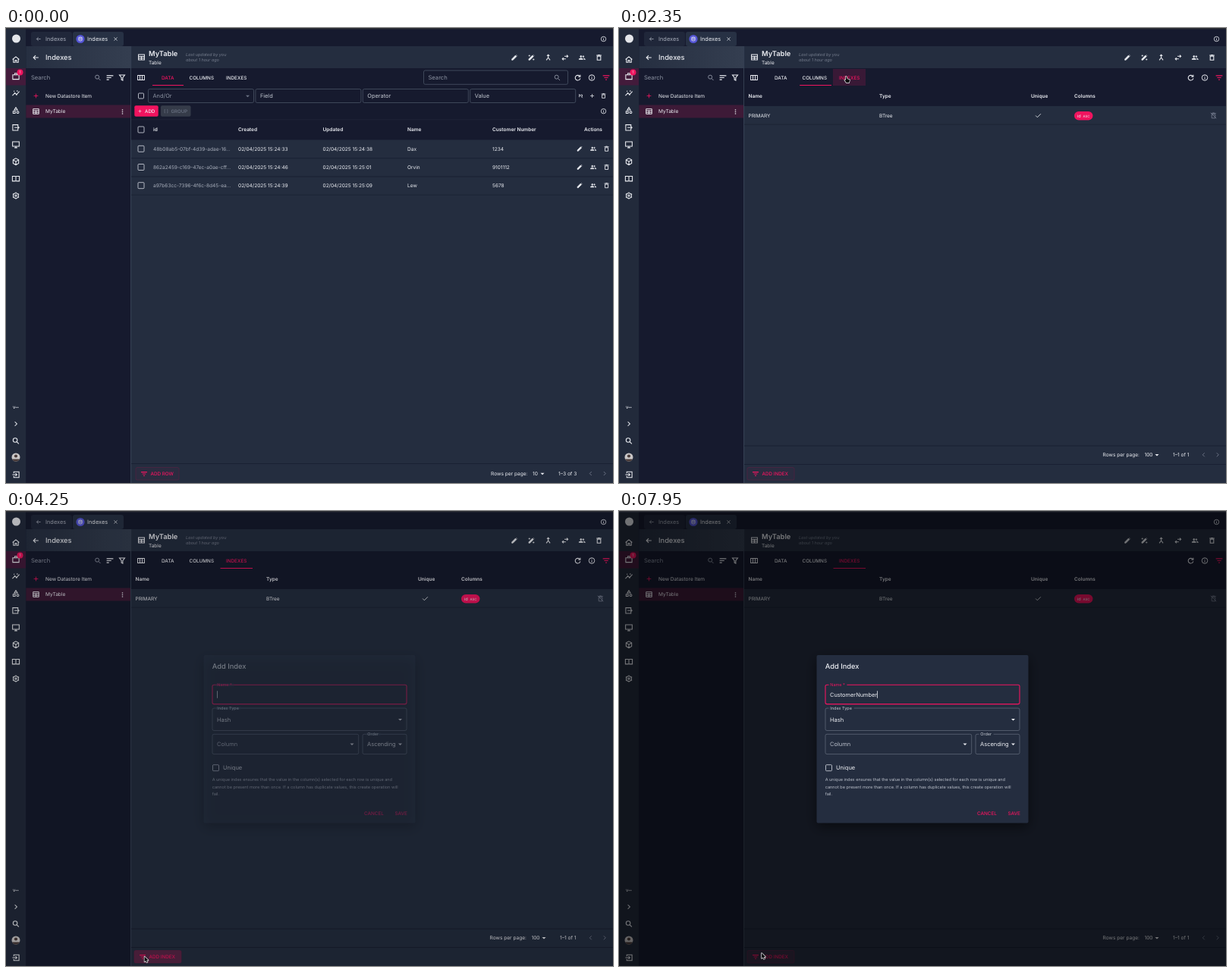
These frames come from a looping animation (800 by 600 pixels, 8000 ms). An HTML page with a canvas:

```html
<!DOCTYPE html>
<html lang="en">
<head>
<meta charset="utf-8">
<title>Add index</title>
<style>
html, body { margin: 0; width: 100%; height: 100%; overflow: hidden; background: #161a2e; }
canvas { display: block; width: 800px; height: 600px; }
</style>
</head>
<body>
<canvas id="stage" width="800" height="600"></canvas>
<script>
const ctx = document.getElementById('stage').getContext('2d');
ctx.textRendering = 'geometricPrecision';
const LOOP = 8000;
const NAVY = '#161a2e', SLATE = '#242d3f', PINK = '#f0145f', WHITE = '#eceef3',
  SOFT = '#a7adba', DIM = '#6d7586', EDGE = '#4a5365', LINE = '#192033';

// 24-unit icons, drawn as strokes; those in SOLID are filled too
const disc = (x, y, r) => `M${x + r} ${y}a${r} ${r} 0 1 1 ${-2 * r} 0a${r} ${r} 0 1 1 ${2 * r} 0`;
const PENCIL = 'M4 20v-3.5L15.5 5l3.5 3.5L7.5 20zM18 3l3 3', TRASH = 'M6.5 8v12h11V8zM4 5h16M9 3.5h6';
const SOLID = ['pencil', 'wand', 'people'];
const ICONS = {
  home: 'M5 11v9h5v-6h4v6h5v-9M2.5 12 12 4l9.5 8',
  work: 'M3 7h18v13H3zM9 7V3h6v4',
  trend: 'M2 18l7-7 5 4 8-9M16 3v4M7 4v3' + disc(9, 11, 1) + disc(14, 15, 1),
  shapes: 'M12 3l4.5 7h-9zM4 14h6v6H4z' + disc(17.5, 17, 3),
  output: 'M18 8V4H3v16h15v-4M8 12h13M17 8l4 4-4 4',
  screen: 'M2.5 4h19v13h-19zM8 21h8M12 17v4',
  box: 'M12 2.5l8 4.5v10l-8 4.5L4 17V7zM4 7l8 5 8-5M12 12v9',
  book: 'M12 6v14M2 5h7q3 0 3 2 0-2 3-2h7v14h-7q-3 0-3 1 0-1-3-1H2z',
  gear: disc(12, 12, 7.5) + disc(12, 12, 2.5) + 'M12 2v3M12 19v3M3 7l3 2M18 15l3 2M3 17l3-2M18 9l3-2',
  right: 'M9 6l6 6-6 6',
  left: 'M15 6l-6 6 6 6',
  search: disc(10, 10, 6) + 'M14.5 14.5l6 6',
  login: 'M6 8V4h15v16H6v-4M2 12h13M11 8l4 4-4 4',
  back: 'M20 12H5M11 5l-7 7 7 7',
  close: 'M5 5l14 14M19 5L5 19',
  info: disc(12, 12, 9) + 'M12 11v6M12 7v2',
  sort: 'M2 6h20M2 12h14M2 18h7',
  funnel: 'M4 4h16l-6 8v8l-4-2v-6z',
  plus: 'M12 4v16M4 12h16',
  table: 'M3 4h18v16H3zM3 9.5h18M3 15h18M12 9v11',
  columns: 'M2 5h20v14H2zM8.7 5v14M15.3 5v14',
  pencil: PENCIL,
  wand: PENCIL + 'M6 3v6M3 6h6M19 15v6M16 18h6',
  merge: 'M12 3v9l-6 8M12 12l6 8M8 7l4-4 4 4',
  swap: 'M10 8h11M17 4l4 4-4 4M14 16H3M7 12l-4 4 4 4',
  people: disc(8.5, 8.5, 2.5) + disc(16, 8.5, 2) + 'M2.5 18v-2q6-4 12 0v2zM17 14q5 1 5 4h-4',
  trash: TRASH,
  trashOff: TRASH + 'M3 3l18 18',
  refresh: 'M18 7a8 8 0 1 0 2 7M20 3v6h-6',
  filter: 'M2 6h20M6 12h12M10 18h4',
  check: 'M3 12l6 6L21 6',
  unlink: 'M5 5l14 15M6 8v9M11 8h7v7',
  braces: 'M8 4H5v16h3M16 4h3v16h-3',
  db: 'M5 6q7-5 14 0v12q-7 5-14 0zM5 6q7 4 14 0M5 12q7 4 14 0'
};
for (const name in ICONS) ICONS[name] = new Path2D(ICONS[name]);

const ARROW = new Path2D('M0 0v8.2l2-1.7 1.4 2.9 1.4-.7-1.4-2.7h2.6z');
const HAND = new Path2D('M-1 0q1-1.2 1.7 0l.5 3 3.4 1q.9.4.6 1.5l-.8 3.3H.2L-2.6 5q.2-1.2 1.9-.1z');

function icon(name, x, y, size = 10, color = WHITE, width = 2.3) {
  ctx.save();
  ctx.translate(x - size / 2, y - size / 2);
  ctx.scale(size / 24, size / 24);
  ctx.strokeStyle = ctx.fillStyle = color;
  const solid = SOLID.includes(name);
  ctx.lineWidth = solid ? 1.6 : width;
  ctx.stroke(ICONS[name]);
  if (solid) ctx.fill(ICONS[name]);
  ctx.restore();
}

function fill(x, y, w, h, color, r = 0) {
  ctx.fillStyle = color;
  ctx.beginPath();
  ctx.roundRect(x, y, w, h, r);
  ctx.fill();
}

function frame(x, y, w, h, color = EDGE, r = 2, width = 0.8) {
  ctx.strokeStyle = color;
  ctx.lineWidth = width;
  ctx.beginPath();
  ctx.roundRect(x, y, w, h, r);
  ctx.stroke();
}

function dot(x, y, r, color) {
  ctx.fillStyle = color;
  ctx.beginPath();
  ctx.arc(x, y, r, 0, 7);
  ctx.fill();
}

// y is the middle of the capital letters
function text(str, x, y, size = 6.6, color = WHITE, weight = 400, style = '') {
  ctx.font = `${style} ${weight} ${size}px Inter, sans-serif`;
  ctx.fillStyle = color;
  ctx.fillText(str, x, y + size * 0.364);
}

function caretDown(x, y, color = WHITE) {
  ctx.fillStyle = color;
  ctx.beginPath();
  ctx.moveTo(x - 2.5, y - 1.2);
  ctx.lineTo(x + 2.5, y - 1.2);
  ctx.lineTo(x, y + 1.3);
  ctx.fill();
}

const checkbox = (x, y, s = 8) => frame(x - s / 2, y - s / 2, s, s, '#c3c8d2', 1, 0.9);
const clamp = v => Math.max(0, Math.min(1, v));
const ramp = (t, a, b) => clamp((t - a) / (b - a));
const smooth = v => v * v * (3 - 2 * v);
// press feedback: quick rise, slow fade
const ripple = (t, at) => ramp(t, at, at + 200) * (1 - ramp(t, at + 250, at + 750));

const TAB_CLICK = 2100, ADD_CLICK = 4050;
const PAGE_SWAP = TAB_CLICK + 100, DIALOG_OPEN = ADD_CLICK + 100;

function rail() {
  fill(0, 0, 26, 600, '#222a3b');
  fill(0, 53, 26, 22.5, '#431b3b');
  dot(13.5, 14, 5.5, '#e4e6ea');
  const names = ['home', 'work', 'trend', 'shapes', 'output', 'screen', 'box', 'book', 'gear'];
  names.forEach((n, i) => icon(n, 13, 41.5 + i * 22.45, 11));
  dot(18.5, 58.5, 4, PINK);
  text('1', 17.6, 58.5, 5);
  text('V••', 9, 500, 4.6, WHITE, 600);
  icon('right', 13, 522, 11);
  icon('search', 13, 544.5, 11);
  dot(13, 566, 5.5, '#c9c6c6');
  dot(13, 564.5, 2.1, '#4a3c3a');
  ctx.beginPath();
  ctx.arc(13, 566, 5.5, 0.45, Math.PI - 0.45);
  ctx.fill();
  icon('login', 13, 589, 11);
}

function tabStrip() {
  fill(26, 0, 774, 24, NAVY);
  fill(33, 5, 54, 19, '#20273a', 3);
  icon('back', 43, 14.5, 8, SOFT);
  text('Indexes', 52, 14.5, 7.4, SOFT);
  fill(88, 5, 67, 19, '#273144', 3);
  dot(98, 14.5, 5.6, '#5455d6');
  icon('db', 98, 14.5, 7.5);
  text('Indexes', 107, 14.5, 7.4);
  icon('close', 144.5, 14.5, 7, WHITE, 2.6);
  icon('info', 787.5, 14.5, 8.5);
}

function sidebar() {
  fill(26, 24, 138, 576, NAVY);
  const head = ctx.createLinearGradient(26, 0, 164, 0);
  head.addColorStop(0, '#262f41');
  head.addColorStop(1, '#343e50');
  fill(26, 24, 138, 29, head);
  icon('back', 39.5, 39, 10, WHITE, 2.6);
  text('Indexes', 52, 39, 9.3, WHITE, 500);
  text('Search', 33, 65.5, 7.6, '#8b92a1');
  icon('search', 121, 65.5, 10, '#8b92a1');
  icon('sort', 137, 65.5, 10.5, WHITE, 2.6);
  icon('funnel', 153, 65.5, 10.5, WHITE, 2.5);
  icon('plus', 39.5, 89.5, 8.5, PINK);
  text('New Datastore Item', 52, 89.5, 6.55);
  fill(26, 101.5, 138, 17, '#3d1a37');
  icon('table', 39.5, 110, 10);
  text('MyTable', 52, 110, 6.55);
  for (const dy of [-2.5, 0, 2.5]) dot(153.5, 110.5 + dy, 0.8, WHITE);
  fill(25.6, 24, 0.8, 576, '#1b2234');
}

function mainHead(t) {
  fill(165, 24, 635, 576, SLATE);
  fill(164, 24, 1.2, 576, '#343e51');
  icon('table', 178.5, 38.5, 10.5);
  text('MyTable', 188, 34, 9.3, WHITE, 600);
  text('Table', 188, 46, 6.5);
  text('Last updated by you', 237, 34.5, 5.5, '#737b8b', 400, 'italic');
  text('about 1 hour ago', 237, 42, 5.5, '#737b8b', 400, 'italic');
  ['pencil', 'wand', 'merge', 'swap', 'people', 'trash']
    .forEach((n, i) => icon(n, 670 + i * 22.3, 39, 10, WHITE, 2.5));

  fill(165, 53, 635, 24, NAVY);
  icon('columns', 178, 65.5, 10.5);
  const move = smooth(ramp(t, PAGE_SWAP, PAGE_SWAP + 300));
  fill(282, 54, 43, 22, `rgba(240,20,95,${0.16 * ripple(t, TAB_CLICK)})`);
  const tab = (s, x, on) => text(s, x, 65.5, 6.35, on ? PINK : WHITE, 500);
  tab('DATA', 205, t < PAGE_SWAP);
  tab('COLUMNS', 241.5, false);
  tab('INDEXES', 290, t >= PAGE_SWAP);
  fill(193 + 89.5 * move, 75, 41 + 1.5 * move, 1, PINK);
  icon('refresh', 753.5, 65.5, 10, WHITE, 2.6);
  icon('info', 772, 65.5, 10);
  icon('filter', 791, 65.5, 10.5, PINK, 2.4);
}

function pager(x, y, size, range) {
  text('Rows per page:', x, y);
  text(size, x + 55, y);
  caretDown(size.length > 2 ? 709 : 707, y + 0.5);
  text(range, size.length > 2 ? 730 : 728, y);
  icon('left', 770.5, y, 10, DIM);
  icon('right', 789, y, 10, DIM);
}

function addButton(label, x, w, tint) {
  fill(x, 579.5, w, 16.5, `rgba(240,20,95,${tint})`, 2);
  frame(x, 579.5, w, 16.5, 'rgba(150,20,70,.35)', 2, 0.8);
  icon('filter', x + 11, 588, 9.5, PINK, 2.6);
  text(label, x + 19.5, 588, 6.3, PINK, 500);
}

function dataView() {
  fill(165, 77, 635, 70.5, NAVY);
  frame(550.5, 56, 190, 18.3);
  text('Search', 556.5, 65.5, 7.6, '#8b92a1');
  icon('search', 726.5, 65.5, 10, '#8b92a1');

  checkbox(178, 89.5, 7);
  ['And/Or', 'Field', 'Operator', 'Value'].forEach((s, i) => {
    const x = 187.5 + i * 141.4;
    frame(x, 80.5, 139, 18);
    text(s, x + 6, 89.5, 7.4, i ? '#c2c7d0' : '#8b92a1');
  });
  caretDown(318.5, 90, DIM);
  icon('unlink', 757.5, 89.5, 8);
  icon('plus', 772.5, 89.5, 7.5);
  icon('trash', 787.5, 89.5, 8.5);

  fill(169.3, 102.2, 31.4, 14.6, PINK, 2);
  icon('plus', 176.5, 109.7, 6);
  text('ADD', 183, 109.7, 6.2, WHITE, 500);
  fill(204, 102.2, 39.5, 14.6, '#353b49', 2);
  icon('braces', 211, 109.7, 6.5, DIM);
  text('GROUP', 217.5, 109.7, 6.1, DIM, 500);
  icon('info', 787.5, 109.7, 8.5);
  fill(165, 120.5, 635, 0.7, '#20273a');

  const cols = [194, 306, 417.5, 529, 641];
  checkbox(178, 134);
  ['id', 'Created', 'Updated', 'Name', 'Customer Number']
    .forEach((s, i) => text(s, cols[i], 134, 6.5, WHITE, 600));
  text('Actions', 762, 134, 6.5, WHITE, 600);

  [
    ['48b08ab5-07bf-4d39-adae-16…', '24:33', '24:38', 'Dax', '1234'],
    ['862a2459-c169-47ec-a0ae-cff…', '24:46', '25:01', 'Orvin', '9101112'],
    ['a97b63cc-7396-4f6c-8d45-ea…', '24:39', '25:09', 'Lew', '5678']
  ].forEach((row, r) => {
    const y = 159.3 + r * 24.2;
    checkbox(178, y);
    row.forEach((s, i) => {
      const stamp = i === 1 || i === 2;
      text(stamp ? '02/04/2025 15:' + s : s, cols[i], y, 6.55, i ? WHITE : SOFT);
    });
    icon('pencil', 756, y, 9);
    icon('people', 774, y, 9);
    icon('trash', 791.5, y, 9);
    fill(165, y + 12, 635, 0.9, LINE);
  });

  fill(165, 574, 635, 0.9, LINE);
  addButton('ADD ROW', 171, 57, 0.03);
  pager(639, 587.5, '10', '1–3 of 3');
}

function indexView(t) {
  fill(165, 77, 635, 26, NAVY);
  const head = (s, x) => text(s, x, 90, 6.5, WHITE, 600);
  head('Name', 170.5);
  head('Type', 343);
  head('Unique', 543);
  head('Columns', 600);
  text('PRIMARY', 170.5, 115.3, 6.5);
  text('BTree', 343, 115.3, 6.5);
  icon('check', 552.5, 115.5, 9);
  fill(600, 110, 24.5, 11.5, PINK, 5.75);
  text('id', 604, 116, 5.6);
  text('ASC', 611.5, 116, 4.4);
  icon('trashOff', 783.5, 115.5, 10, DIM);
  fill(165, 126.7, 635, 0.9, LINE);
  fill(165, 550.5, 635, 0.9, LINE);
  fill(165, 575, 635, 0.9, LINE);
  pager(637.5, 562.8, '100', '1–1 of 1');
  const hover = ramp(t, 3700, 3900);
  addButton('ADD INDEX', 169, 62, 0.03 + 0.05 * hover + 0.18 * ripple(t, ADD_CLICK));
}

function field(label, x, y, w, h, color = '#5d6676', labelColor = '#c2c7d0', width = 0.8) {
  frame(x, y, w, h, color, 2, width);
  if (!label) return;
  ctx.font = '400 5.6px Inter, sans-serif';
  fill(x + 4.5, y - 2, ctx.measureText(label).width + 4, 4, SLATE);
  text(label, x + 6.3, y, 5.5, labelColor);
}

const WORD = 'CustomerNumber';
const KEYS = [5650, 5750, 5900, 6050, 6100, 6250, 6350, 6450, 6800, 7000, 7150, 7300, 7450, 7550];

function dialog(t) {
  const show = smooth(ramp(t, DIALOG_OPEN, DIALOG_OPEN + 225));
  if (!show) return;
  fill(0, 1.6, 800, 598.4, `rgba(0,0,0,${0.5 * show})`);
  ctx.save();
  ctx.globalAlpha = show;
  ctx.shadowColor = 'rgba(0,0,0,.5)';
  ctx.shadowBlur = 16;
  ctx.shadowOffsetY = 5;
  fill(260.5, 190, 279, 221.5, SLATE, 2);
  ctx.shadowColor = 'transparent';

  text('Add Index', 271.7, 205, 9.3, WHITE, 500);
  field('Name *', 272, 229.3, 256, 25.3, PINK, PINK, 1.1);
  field('Index Type', 272, 260, 256, 29.5);
  text('Hash', 278, 275, 7.5);
  caretDown(519.5, 275.3);
  field('', 272, 294.3, 192.7, 26.3);
  text('Column', 278, 307.5, 7.5, '#b9bec9');
  caretDown(456, 307.8);
  field('Order', 470, 294.3, 58, 26.3);
  text('Ascending', 476, 307.5, 7.5);
  caretDown(519.5, 307.8);
  checkbox(276.5, 338.7);
  text('Unique', 286, 338.7, 7.5);
  [
    'A unique index ensures that the value in the column(s) selected for each row is unique and',
    'cannot be present more than once. If a column has duplicate values, this create operation will',
    'fail.'
  ].forEach((s, i) => text(s, 271.7, 354.3 + i * 9.3, 5.55, '#b9bec9'));
  text('CANCEL', 472, 399, 6.35, PINK, 500);
  text('SAVE', 512.5, 399, 6.35, PINK, 500);

  const typed = WORD.slice(0, KEYS.filter(k => t >= k).length);
  text(typed, 278, 242, 7.4);
  if (t < 4850 || t >= 5450) fill(278 + ctx.measureText(typed).width, 237.3, 0.8, 9.4, WHITE);

  const hint = ramp(t, 5700, 5800) * (1 - ramp(t, 7550, 7700));
  if (hint) {
    ctx.globalAlpha = hint;
    fill(318, 259, 84, 21.5, '#1e1f23', 4);
    ctx.beginPath();
    ctx.moveTo(322, 259.2);
    ctx.lineTo(327.5, 255.5);
    ctx.lineTo(333, 259.2);
    ctx.fill();
    text(WORD, 323, 269.5, 7.2, WHITE, 500);
  }
  ctx.restore();
}

// pointer stops: time, x, y
const STOPS = [[350, 803, 330], [1650, 299.5, 64.5], [2700, 299.5, 64.5], [3500, 174, 569], [3570, 174, 569], [3800, 182.5, 587.5]];

function pointer(t) {
  if (t < STOPS[0][0]) return;
  let [, x, y] = STOPS[STOPS.length - 1];
  for (let i = 1; i < STOPS.length; i++) {
    const [a, ax, ay] = STOPS[i - 1], [b, bx, by] = STOPS[i];
    if (t >= b) continue;
    const k = smooth(ramp(t, a, b));
    x = ax + (bx - ax) * k;
    y = ay + (by - ay) * k;
    break;
  }
  if (t >= 7950) [x, y] = [188, 583];
  const overTab = x > 282 && x < 325 && y > 53 && y < 77;
  const overButton = y > 579.5 && t < DIALOG_OPEN + 100;
  const shape = overTab || overButton ? HAND : ARROW;
  ctx.save();
  ctx.translate(x, y);
  ctx.scale(0.85, 0.85);
  ctx.lineJoin = 'round';
  ctx.lineWidth = 1.6;
  ctx.strokeStyle = '#f4f4f6';
  ctx.stroke(shape);
  ctx.fillStyle = '#08090c';
  ctx.fill(shape);
  ctx.restore();
}

function draw() {
  const t = performance.now() % LOOP;
  mainHead(t);
  if (t < PAGE_SWAP) dataView();
  else indexView(t);
  sidebar();
  tabStrip();
  rail();
  fill(0, 0, 800, 1.6, '#2c2e34');
  dialog(t);
  pointer(t);
  requestAnimationFrame(draw);
}
draw();
</script>
</body>
</html>
```
